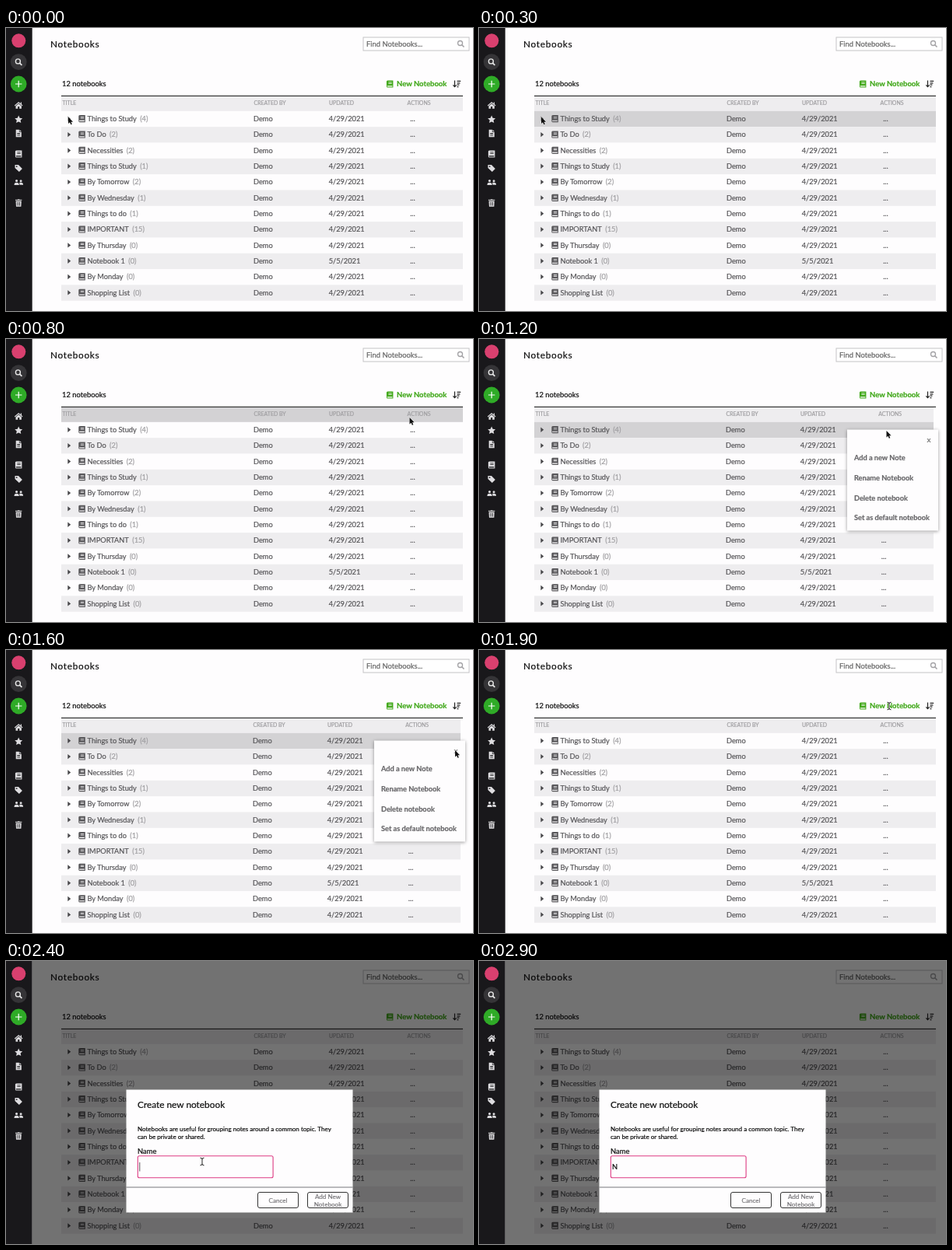
An HTML page for the animation above (3 s loop, 600x364 px).

```html
<!DOCTYPE html>
<html lang="en">
<head>
<meta charset="utf-8">
<title>Notebooks</title>
<style>
html, body { margin: 0; width: 100%; height: 100%; overflow: hidden; background: #fefdfe; }
svg { display: block; width: 600px; height: 364px; font: 9.25px Lato, "Open Sans", sans-serif; }
text { white-space: pre; stroke-width: .22px; }
</style>
</head>
<body>
<svg id="stage" viewBox="0 0 600 364" xmlns="http://www.w3.org/2000/svg"></svg>
<script>
const LOOP = 3000, STEP = 100;
const ROW = 20.33, TOP = 106.8, INK = '#58575a', FAINT = '#a09fa2';
const stage = document.getElementById('stage');

const notebooks = [
  ['Things to Study', 4], ['To Do', 2], ['Necessities', 2], ['Things to Study', 1],
  ['By Tomorrow', 2], ['By Wednesday', 1], ['Things to do', 1], ['IMPORTANT', 15],
  ['By Thursday', 0], ['Notebook 1', 0], ['By Monday', 0], ['Shopping List', 0]
];

// Icons are centred on 0,0
const icons = {
  book: 'M-3-4.6H4.2V4.6H-3A1.4 1.4 0 0 1-4.3 3.2V-3.2A1.4 1.4 0 0 1-3-4.6ZM-1.8-2.6V-1.8H2.5V-2.6ZM-1.8-1V-.2H2.5V-1ZM-3 2.2A.6.6 0 0 0-3 3.4H3.2V2.2Z',
  home: 'M0-4.6L5.3 .1L4.6 .9L0-3.1L-4.6 .9L-5.3 .1ZM0-2.2L3.7 1V4.3H1V1.4H-1V4.3H-3.7V1ZM2.6-4H3.8V-1.2L2.6-2.3Z',
  star: 'M0-5L1.5-1.7L5-1.3L2.4 1.1L3.1 4.6L0 2.9L-3.1 4.6L-2.4 1.1L-5-1.3L-1.5-1.7Z',
  file: 'M-3.5-4.7H.7V-1.8H3.6V4.7H-3.5ZM1.3-4.7L3.6-2.4H1.3ZM-1.9-.2V.5H1.9V-.2ZM-1.9 1.1V1.8H1.9V1.1ZM-1.9 2.4V3.1H1.9V2.4Z',
  tag: 'M-4.7-4.4H-.2L4.7 .5L.7 4.6L-4.7-.5ZM-3.4-2.4A.9.9 0 1 0-1.6-2.4A.9.9 0 1 0-3.4-2.4Z',
  users: 'M-4.2-2A1.6 1.6 0 1 0-1-2A1.6 1.6 0 1 0-4.2-2ZM1.4-1.8A1.5 1.5 0 1 0 4.4-1.8A1.5 1.5 0 1 0 1.4-1.8ZM-5.6 3.6V2.2Q-5.4.2-2.6.2Q.2.2.5 2.2V3.6ZM1.3 3.2Q1.5 1.2.7.5Q5.4-.4 5.8 2V3.2Z',
  trash: 'M-4.2-4.2H-1.5L-1-4.8H1L1.5-4.2H4.2V-3.2H-4.2ZM-3.6-2.6H3.6L3.2 4.7H-3.2ZM-1.9-1.3V3.4H-1.3V-1.3ZM-.3-1.3V3.4H.3V-1.3ZM1.3-1.3V3.4H1.9V-1.3Z',
  caret: 'M-1.9-3.2L2-0L-1.9 3.2Z',
  arrow: 'M0 0V8.6L2 6.8L3.3 9.8L4.8 9.2L3.5 6.3L6.1 6.2Z'
};

const icon = (name, x, y, fill, extra = '') =>
  `<path d="${icons[name]}" transform="translate(${x} ${y})" fill="${fill}" fill-rule="evenodd" ${extra}/>`;
const text = (x, y, s, color, extra = '') =>
  `<text x="${x}" y="${y}" fill="${color}" stroke="${color}" ${extra}>${s}</text>`;
const rect = (x, y, w, h, fill, extra = '') =>
  `<rect x="${x}" y="${y}" width="${w}" height="${h}" fill="${fill}" ${extra}/>`;
const disc = (x, y, r, fill) => `<circle cx="${x}" cy="${y}" r="${r}" fill="${fill}"/>`;
const line = (d, stroke, w, extra = '') =>
  `<path d="${d}" fill="none" stroke="${stroke}" stroke-width="${w}" ${extra}/>`;
const lens = (x, y, color, w) =>
  `<circle cx="${x - .8}" cy="${y - .8}" r="3" fill="none" stroke="${color}" stroke-width="${w}"/>` +
  line(`M${x + 1.4} ${y + 1.4}L${x + 4.2} ${y + 4.2}`, color, w + .3);

function sidebar() {
  const side = [['home', 99.5], ['star', 117.5], ['file', 135.5], ['book', 162],
    ['tag', 180.5], ['users', 198.5], ['trash', 225]];
  return rect(0, 0, 33.7, 364, '#19181b') +
    disc(16.3, 16.3, 9, '#d9406f') +
    disc(16.2, 43.7, 10.4, '#353437') + lens(16.2, 43.7, '#e8e8e8', 1.4) +
    disc(16.2, 72, 10.4, '#2fab27') + line('M12 72H20.4M16.2 67.8V76.2', '#fff', 1.2) +
    side.map(([name, y]) => icon(name, 16.2, y, '#dedde0')).join('');
}

function header() {
  return text(57, 24.8, 'Notebooks', '#111', 'font-size="11.8" letter-spacing=".72"') +
    rect(459, 12, 136, 17, '#fff', 'stroke="#c4c3c6" stroke-width="1"') +
    text(463, 23.8, 'Find Notebooks...', '#666', 'font-size="9.4"') +
    lens(584.3, 20.3, '#a3a2a5', 1.3) +
    text(72, 75.4, '12 notebooks', '#111', 'font-size="9.35"') +
    icon('book', 493.2, 72, '#43a91c') +
    text(502, 75.4, 'New Notebook', '#43a91c', 'font-weight="700" font-size="9.5"') +
    line('M576.5 67.5V75.5M574.4 73.4L576.5 75.7L578.6 73.4', '#222', 1.2) +
    line('M579.5 68.4H584.2M579.5 70.8H583.4M579.5 73.2H582.4M579.5 75.6H581.4', '#222', 1.2);
}

function table(hover, open, shift) {
  const width = 516 - shift * 1.5;
  const cols = [318 - shift * .5, 415 - shift, 515.6 - shift * 1.2];
  const list = notebooks.map(([name, count]) => ({ name, count }));
  if (open) list.splice(1, 0, ...[1, 2, 3, 4].map(n => ({ name: 'Note ' + n, child: true })));

  const head = (x, s) => text(x, 99.4, s, FAINT, 'font-size="6.95"');
  let out = rect(71, 87, width, TOP - 87, hover === 'head' ? '#d3d2d4' : '#eeedef') +
    rect(71, 86.8, 516, 1.2, '#333') +
    head(72.5, 'TITLE') + head(cols[0] + .6, 'CREATED BY') + head(cols[1], 'UPDATED') + head(cols[2], 'ACTIONS');

  list.forEach((row, i) => {
    const y = TOP + i * ROW, mid = y + ROW / 2, base = mid + 3.2;
    const fill = hover === i ? '#d3d2d4' : i % 2 ? '#eeedef' : 'none';
    const date = row.name === 'Notebook 1' ? '5/5/2021' : '4/29/2021';
    out += rect(71, y, width, ROW, fill);
    if (row.child) {
      out += icon('file', 110, mid, INK) + text(118, base, row.name, INK);
    } else {
      const count = `<tspan dx="4.4" fill="${FAINT}" stroke="${FAINT}">(${row.count})</tspan>`;
      out += icon('caret', 81.2, mid - .2, '#48474a') + icon('book', 97.6, mid - .3, INK) +
        text(104.5, base, row.name + count, INK);
    }
    out += text(cols[0], base, 'Demo', INK) + text(cols[1] - .3, base, date, INK) +
      text(cols[2] + 3.6, base, '...', INK);
  });
  return out;
}

function menu() {
  const items = ['Add a new Note', 'Rename Notebook', 'Delete notebook', 'Set as default notebook'];
  return rect(473, 116.5, 117, 130, '#fefdfe', 'style="filter:drop-shadow(0 1px 2px rgba(0,0,0,.4))"') +
    text(575.4, 132.6, 'x', '#777', 'font-size="10"') +
    items.map((s, i) => text(482, 156.4 + i * 25.6, s, '#69686b', 'font-weight="700" font-size="9.2"')).join('');
}

function modal(focused, value, caret) {
  const button = (x, lines) => rect(x, 297.5, 52, 20, '#fefdfe', 'rx="2.5" stroke="#333"') +
    lines.map((s, i) => text(x + 26, 310.6 + (i - (lines.length - 1) / 2) * 9.8, s, '#7c7b7e',
      'font-size="8.1" text-anchor="middle"')).join('');
  const border = focused ? 'stroke="#dd3b83" stroke-width="1.1"' : 'stroke="#161616" stroke-width="1.2"';
  return rect(34, 0, 566, 364, '#000', 'opacity=".55"') +
    rect(154.5, 165.5, 291, 158, '#fefdfe') +
    text(169, 188.6, 'Create new notebook', '#111', 'font-size="11.85"') +
    text(169, 219, 'Notebooks are useful for grouping notes around a common topic. They', '#111', 'font-size="8.05"') +
    text(169, 229, 'can be private or shared.', '#111', 'font-size="8.05"') +
    text(169, 248.2, 'Name', '#111', 'font-size="9.4"') +
    rect(169.3, 250.7, 173.8, 28, '#fefdfe', 'rx="2" ' + border) +
    text(171, 268, value, '#111') +
    (caret ? rect(value ? 179 : 171.5, 259, .7, 11.5, '#111') : '') +
    line('M154.5 291H445.5', '#77767a', 1) +
    button(323.5, ['Cancel']) + button(387.5, ['Add New', 'Notebook']);
}

// Pointer path: step, x, y
const path = [
  [0, 80, 114.5], [6, 80, 114.5], [7, 420, 75], [8, 518.5, 101], [9, 521, 112], [11, 523.5, 118],
  [13, 523.5, 118], [16, 577, 129], [17, 577, 129], [19, 527, 72], [20, 527, 71],
  [24, 252, 258], [25, 252, 258], [27, 254, 261], [30, 254, 261]
];

function pointer(step) {
  const i = path.findIndex(p => p[0] > step);
  const [s0, x0, y0] = path[i - 1], [s1, x1, y1] = path[i];
  const k = (step - s0) / (s1 - s0);
  const x = x0 + (x1 - x0) * k, y = y0 + (y1 - y0) * k;
  if (step === 19 || step >= 24) {
    const d = `M${x - 2.5} ${y - 4.8}Q${x} ${y - 4.8} ${x} ${y - 3}V${y + 3}Q${x} ${y + 4.8} ${x - 2.5} ${y + 4.8}` +
      `M${x + 2.5} ${y - 4.8}Q${x} ${y - 4.8} ${x} ${y - 3}M${x} ${y + 3}Q${x} ${y + 4.8} ${x + 2.5} ${y + 4.8}`;
    return line(d, '#fff', 2) + line(d, '#222', 1);
  }
  return icon('arrow', x, y, '#111', 'stroke="#fff" stroke-width=".8" paint-order="stroke"');
}

function hovered(step) {
  if (step === 8 || step === 18) return 'head';
  if (step === 17) return 1;
  return (step >= 3 && step <= 6) || (step >= 9 && step <= 16) ? 0 : null;
}

function draw(step) {
  const menuOpen = step >= 12 && step < 17;
  const typed = step >= 28;
  stage.innerHTML = rect(0, 0, 600, 364, '#fefdfe') + header() +
    table(hovered(step), step === 4 || step === 5, menuOpen ? 2 : 0) +
    (menuOpen ? menu() : '') +
    (step >= 20 ? modal(step >= 24, typed ? 'N' : '', step >= 24 && step < 29) : '') +
    sidebar() + (typed ? '' : pointer(step));
}

let shown = -1;
const start = performance.now();
function tick() {
  const step = Math.floor((performance.now() - start) % LOOP / STEP);
  if (step !== shown) draw(shown = step);
  requestAnimationFrame(tick);
}
tick();
</script>
</body>
</html>
```
